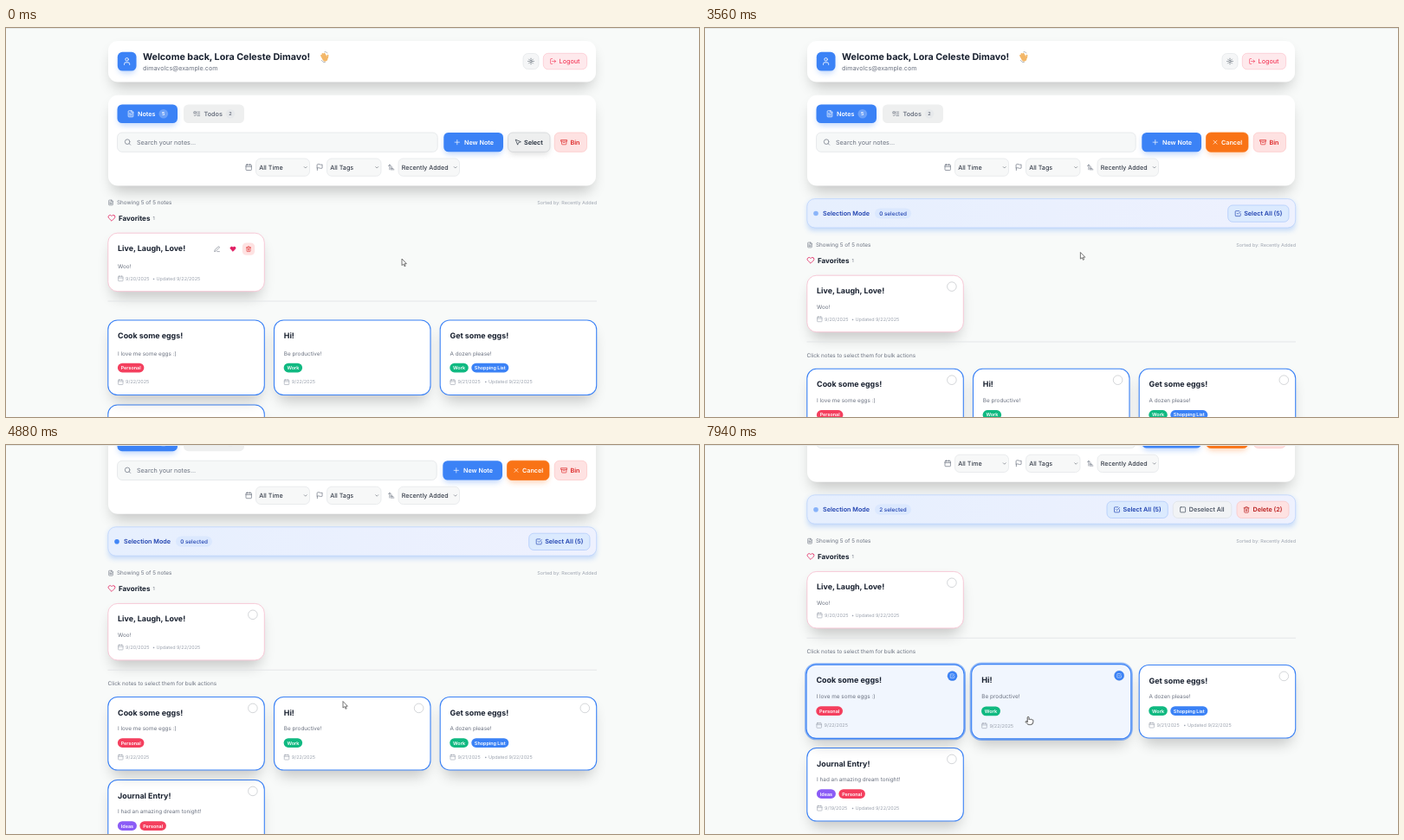
An HTML page that plays this animation: 800 px wide and 450 px high, repeating every 8000 ms.

```html
<!DOCTYPE html>
<html lang="en">
<head>
<meta charset="utf-8">
<title>Notes dashboard</title>
<style>
html, body { margin: 0; width: 100%; height: 100%; overflow: hidden; background: #f8faf9; }
svg { display: block; }
text { font-family: Inter, sans-serif; text-rendering: geometricPrecision; }
.shadow { filter: blur(8px); }
.soft { filter: blur(3px); }
</style>
</head>
<body>
<svg id="stage" width="800" height="450" viewBox="0 0 800 450"></svg>
<script>
const stage = document.getElementById('stage');
const BLUE = '#3b82f6', GREEN = '#10b981', ROSE = '#f43f5e', VIOLET = '#8b5cf6';
const INK = '#18202f', GRAY = '#6b7280', PALE = '#9ca3af', NAVY = '#1e40af', RED = '#dc2626';
const LOOP = 8000, SELECT_AT = 2720, COOK_AT = 6350, HI_AT = 7430;

// Icon outlines on a 24 x 24 grid
const ICONS = {
  user: 'M19 21v-2a4 4 0 0 0-4-4H9a4 4 0 0 0-4 4v2M16 7a4 4 0 1 1-8 0a4 4 0 0 1 8 0',
  sun: 'M16 12a4 4 0 1 1-8 0a4 4 0 0 1 8 0M12 2v2M12 20v2M4.9 4.9l1.4 1.4M17.7 17.7l1.4 1.4M2 12h2M20 12h2M6.3 17.7l-1.4 1.4M19.1 4.9l-1.4 1.4',
  logout: 'M9 21H5a2 2 0 0 1-2-2V5a2 2 0 0 1 2-2h4M16 17l5-5-5-5M21 12H9',
  file: 'M15 2H6a2 2 0 0 0-2 2v16a2 2 0 0 0 2 2h12a2 2 0 0 0 2-2V7ZM14 2v6h6M8 9h2M8 13h8M8 17h8',
  todo: 'M3 5h6v6H3zM3 17l2 2 4-4M13 6h8M13 12h8M13 18h8',
  search: 'M19 11a8 8 0 1 1-16 0a8 8 0 0 1 16 0M21 21l-4.3-4.3',
  plus: 'M12 4v16M4 12h16',
  cross: 'M18 6L6 18M6 6l12 12',
  pointer: 'M4 4l7 17 2.5-7.4 7.5-2.6z',
  bin: 'M2 4h20v5H2zM4 9v9a2 2 0 0 0 2 2h12a2 2 0 0 0 2-2V9M10 13h4',
  calendar: 'M8 2v4M16 2v4M3 10h18M5 4h14a2 2 0 0 1 2 2v14a2 2 0 0 1-2 2H5a2 2 0 0 1-2-2V6a2 2 0 0 1 2-2z',
  flag: 'M4 15s1-1 4-1 5 2 8 2 4-1 4-1V3s-1 1-4 1-5-2-8-2-4 1-4 1zM4 22v-7',
  sort: 'M3 8l4-4 4 4M7 4v16M11 12h4M11 16h7M11 20h10',
  chevron: 'M5 9l7 7 7-7',
  heart: 'M20.8 4.6a5.5 5.5 0 0 0-7.8 0L12 5.7l-1-1a5.5 5.5 0 0 0-7.8 7.8L12 21.2l8.8-8.8a5.5 5.5 0 0 0 0-7.8z',
  pencil: 'M17 3a2.8 2.8 0 0 1 4 4L7.5 20.5 2 22l1.500-5.500zM13 22h9',
  trash: 'M3 6h18M19 6v14a2 2 0 0 1-2 2H7a2 2 0 0 1-2-2V6M8 6V4a2 2 0 0 1 2-2h4a2 2 0 0 1 2 2v2M10 11v6M14 11v6',
  check: 'M9 11l3 3L21 5M21 12v7a2 2 0 0 1-2 2H5a2 2 0 0 1-2-2V5a2 2 0 0 1 2-2h11',
  square: 'M5 3h14a2 2 0 0 1 2 2v14a2 2 0 0 1-2 2H5a2 2 0 0 1-2-2V5a2 2 0 0 1 2-2z',
  hand: 'M7 15V4a2 2 0 0 1 4 0v5a2 2 0 0 1 3.500 0a2 2 0 0 1 3.500 1a2 2 0 0 1 3.500 1v4a7 7 0 0 1-7 7h-2c-3 0-4.500-1-6-2.400l-3.600-3.600a2 2 0 0 1 2.800-2.800z'
};

// Drawing helpers: text and icons are placed by their vertical centre
const rect = (x, y, w, h, r, fill, stroke = 'none', more = '') =>
  `<rect x="${x}" y="${y}" width="${w}" height="${h}" rx="${r}" fill="${fill}" stroke="${stroke}" ${more}/>`;
const circle = (x, y, r, fill, more = '') => `<circle cx="${x}" cy="${y}" r="${r}" fill="${fill}" ${more}/>`;
const text = (x, y, size, str, fill, weight = 400, anchor = 'start') =>
  `<text x="${x}" y="${y + size * .364}" font-size="${size}" fill="${fill}" font-weight="${weight}" text-anchor="${anchor}">${str}</text>`;
const icon = (name, x, y, size, color, fill = 'none') =>
  `<path d="${ICONS[name]}" transform="translate(${x - size / 2} ${y - size / 2}) scale(${size / 24})" fill="${fill}" stroke="${color}" stroke-width="2" stroke-linecap="round" stroke-linejoin="round"/>`;
const shadow = (x, y, w, h) => rect(x + 4, y + 11, w - 8, h - 4, 10, '#000', 'none', 'class="shadow" opacity=".2"');
const glow = (x, y, w, h, color) => rect(x + 1, y + 3, w - 2, h, 6, color, 'none', 'class="soft" opacity=".3"');
const button = (x, y, w, h, name, label, ink, fill, stroke, iconX, textX, weight = 600) =>
  rect(x, y, w, h, 5.5, fill, stroke, 'stroke-width=".7"') +
  icon(name, x + iconX, y + h / 2, 8, ink) + text(x + textX, y + h / 2, 7.2, label, ink, weight);

// Timing helpers
const clamp = v => Math.min(1, Math.max(0, v));
const ramp = (t, from, span = 200) => { const u = clamp((t - from) / span); return u * u * (3 - 2 * u); };
const within = (t, spans) => spans.some(([a, b]) => t >= a && t < b);
const hoverAmount = (t, spans) => spans.reduce((sum, [a, b]) => sum + ramp(t, a) - ramp(t, b), 0);
const mix = (a, b, u) => `rgb(${a.map((v, i) => Math.round(v + (b[i] - v) * u))})`;

const BUTTON_HOVER = [[2250, 3130]];
const COOK_HOVER = [[5850, 6730]];
const HI_HOVER = [[4900, 5750], [6765, 9999]];
const PATH = [[1500, 457, 267], [2350, 596, 124], [3000, 596, 124], [3800, 389, 296.500],
  [5250, 389, 296.500], [6150, 253, 328], [6500, 253, 328], [7050, 373, 314]];

function cursorAt(t) {
  const next = PATH.findIndex(k => k[0] > t);
  if (next === 0) return PATH[0].slice(1);
  if (next < 0) return PATH.at(-1).slice(1);
  const [t0, x0, y0] = PATH[next - 1], [t1, x1, y1] = PATH[next];
  const u = ramp(t, t0, t1 - t0);
  return [x0 + (x1 - x0) * u, y0 + (y1 - y0) * u];
}

function cursor(t) {
  const [x, y] = cursorAt(t);
  if (within(t, [...BUTTON_HOVER, ...COOK_HOVER, ...HI_HOVER])) return icon('hand', x + 1.5, y + 5, 11, '#444', '#fff');
  return `<path d="M${x} ${y}v7.600l1.800-1.500 1.300 2.700 1.100-.5-1.200-2.600h2.400z" fill="#fff" stroke="#555" stroke-width=".8" stroke-linejoin="round"/>`;
}

function header() {
  return shadow(118, 15, 563, 47) + rect(118, 15, 563, 47.500, 11, '#fff') +
    glow(129, 28, 21.500, 21.500, BLUE) + rect(128.800, 27.800, 21.700, 21.700, 5.500, BLUE) + icon('user', 139.600, 38.500, 10.500, '#fff') +
    text(158, 33.400, 10.700, 'Welcome back, Lora Celeste Dimavo!', INK, 700) +
    text(158, 46, 7.200, 'dimavolcs@example.com', GRAY) +
    `<g transform="translate(367.500 34) rotate(-28)" stroke="#f3b768" stroke-width="1.900" stroke-linecap="round">
      <path d="M-2 0v-3.600M0 0v-4.500M2 0v-3.800M3 2l1.600-2.200"/><ellipse cy="1.500" rx="3" ry="3.300" fill="#f3b768" stroke="none"/>
      <path d="M-4.500 1.500q0 3 2.600 4M3.500-5.500q1.800 .8 2 2.700" fill="none" stroke="#a9adb2" stroke-width=".8"/></g>` +
    rect(597, 29.500, 18, 18, 5.500, '#f5f6f7', '#e2e5e9', 'stroke-width=".7"') + icon('sun', 606, 38.500, 8, '#4b5563') +
    button(620.300, 29.300, 50.300, 18.500, 'logout', 'Logout', ROSE, '#fee9ec', '#fdc4cd', 11.300, 18.300, 500);
}

function dropdown(name, x, w, label) {
  return icon(name, x - 8.300, 161, 8.500, GRAY) +
    rect(x, 151, w, 20.300, 5.500, '#f7f8f8', '#e2e5e9', 'stroke-width=".7"') +
    text(x + 3.800, 161.200, 7.200, label, INK) + icon('chevron', x + w - 4.800, 161.200, 5, INK);
}

function toolbar(t, selecting) {
  const shift = selecting ? ramp(t, 2850, 250) - 2 : 0;
  const turn = ramp(t, 2790, 220), hover = hoverAmount(t, BUTTON_HOVER);
  const grey = mix([238, 239, 239], [218, 218, 219], hover);
  const left = 579.500 + shift;
  const fill = selecting ? mix([218, 218, 219], [249, 115, 22], turn) : grey;
  const edge = selecting ? mix([200, 200, 203], [249, 115, 22], turn) : '#cfd1d5';
  const ink = selecting ? mix([31, 41, 55], [255, 255, 255], turn) : '#1f2937';
  return shadow(118, 78, 563, 104.500) + rect(118, 77.800, 563, 104.700, 11, '#fff') +
    glow(128.500, 88.500, 69.500, 21.500, BLUE) + rect(128.500, 88.500, 69.500, 21.500, 5.500, BLUE) +
    icon('file', 144, 99.300, 8.500, '#fff') + text(152, 99.400, 7.200, 'Notes', '#fff', 600) +
    circle(181.800, 99.300, 5.300, '#fff', 'opacity=".25"') + text(181.800, 99.300, 5.500, 5, '#fff', 600, 'middle') +
    rect(205, 88.500, 70, 21.500, 5.500, '#eeefef') + icon('todo', 220.500, 99.300, 8.500, GRAY) +
    text(228.500, 99.400, 7.200, 'Todos', GRAY, 600) + circle(259, 99.300, 5.300, '#e7e9eb') + text(259, 99.300, 5.500, 2, GRAY, 600, 'middle') +
    rect(128.500, 121, 369.700 + shift, 22.300, 5.500, '#f6f8f8', '#e0e3e6', 'stroke-width=".7"') +
    icon('search', 140.500, 132, 8.500, GRAY) + text(151, 132.200, 7.200, 'Search your notes...', GRAY) +
    glow(505 + shift, 121, 69, 22.300, BLUE) +
    button(505.300 + shift, 121, 68.700, 22.300, 'plus', 'New Note', '#fff', BLUE, 'none', 15.500, 23.700) +
    glow(left, 121, 48.500, 22.300, selecting ? fill : '#999') +
    button(left, 121, 48.500, 22.300, selecting ? 'cross' : 'pointer', selecting ? 'Cancel' : 'Select', ink, fill, edge,
      selecting ? 10.500 : 11.500, selecting ? 17.500 : 18.500) +
    button(633.200, 121, 37.300, 22.300, 'bin', 'Bin', RED, '#fee2e2', '#fdc5c5', 11, 18.300) +
    dropdown('calendar', 288.500, 62, 'All Time') + dropdown('flag', 370.500, 62.500, 'All Tags') + dropdown('sort', 453, 70.500, 'Recently Added');
}

function selectionBar(t, count) {
  const opacity = .75 + .25 * Math.cos((t - SELECT_AT) * Math.PI / 1000);
  const deleteW = count === 2 ? 60 : 58.300;
  const deleteX = 674 - deleteW, deselectX = deleteX - 73.700;
  const selectX = count ? deselectX - 76.300 : 603.700;
  let s = glow(117.500, 197.500, 564.500, 33.500, BLUE) +
    rect(117.800, 197.600, 563.900, 33.400, 9, 'url(#bar)', '#bdd3fb', 'stroke-width=".8"') +
    circle(128, 214.500, 2.800, BLUE, `opacity="${opacity}"`) +
    text(136, 214.600, 7.200, 'Selection Mode', NAVY, 600) +
    rect(196, 208.400, 42, 12.200, 6.100, '#dbe8fe') + text(217, 214.600, 6.350, count + ' selected', NAVY, 500, 'middle') +
    button(selectX, 205, 70.300, 19.300, 'check', 'Select All (5)', NAVY, '#dbeafe', '#abc8fb', 11.500, 18.500);
  if (count) s +=
    button(deselectX, 205, 67.500, 19.300, 'square', 'Deselect All', '#374151', '#f1f3f5', '#dde1e6', 11.300, 18.500, 500) +
    button(deleteX, 205, deleteW, 19.300, 'trash', `Delete (${count})`, '#b91c1c', '#fee2e2', '#fdc2c2', 11, 18.500);
  return s;
}

// A note card; marked goes from 0 (plain) to 1 (ticked)
function card({ x, y, title, body, tags = [], date, updated, favorite, selecting, marked = 0, hover = 0 }) {
  const w = 180.500, drop = selecting ? 2 : 0;
  const h = (favorite ? 67.500 : 86.500) - drop, left = x + 11.300;
  const scale = 1 + Math.max(.02 * hover, .008 * marked);
  const cx = x + w / 2, cy = y + h / 2, dateY = y + h - 15;
  let tagX = left - .2;
  let s = shadow(x, y, w, h);
  if (marked) s += rect(x - .8, y - .8, w + 1.600, h + 1.600, 12, 'none', BLUE, `stroke-width="2.400" opacity="${.55 * marked}"`);
  s += rect(x, y, w, h, 11, mix([255, 255, 255], [241, 246, 254], marked), favorite ? '#f6c3d3' : BLUE, `stroke-width="${favorite ? .9 : 1.100}"`) +
    text(left, y + 17.800, 8.900, title, INK, 700) + text(left, y + 38.400 - drop, 6.350, body, GRAY);
  for (const [label, color, width] of tags) {
    s += rect(tagX, y + 49.800 - drop, width, 10.600, 5.300, color) +
      text(tagX + width / 2, y + 55.100 - drop, 5.450, label, '#fff', 600, 'middle');
    tagX += width + 3.500;
  }
  s += icon('calendar', left + 3.200, dateY, 7.300, PALE) + text(left + 9, dateY, 5.450, date, PALE);
  if (updated) s += text(left + 39.800, dateY, 5.450, '• Updated ' + updated, PALE);
  if (selecting) {
    const tx = x + 167.100, ty = y + 12.900;
    s += circle(tx, ty, 5.300, '#fff', 'stroke="#cfd1d4" stroke-width=".9"');
    if (marked) s += `<g opacity="${marked}">${circle(tx, ty, 5.600, BLUE)}${icon('check', tx, ty, 6, '#fff')}</g>`;
  } else if (favorite) {
    s += icon('pencil', 243.500, y + 18.500, 7, GRAY) + icon('heart', 262, y + 18.500, 7, '#e11d62', '#e11d62') +
      rect(272.800, y + 11.300, 14.300, 14.300, 4.500, '#fee2e2') + icon('trash', 280, y + 18.500, 7, RED);
  }
  return `<g transform="translate(${cx} ${cy}) scale(${scale}) translate(${-cx} ${-cy})">${s}</g>`;
}

function notes(t, selecting) {
  const move = selecting ? 49 : 0, rowY = selecting ? 394.300 : 338, nextY = selecting ? 490.300 : 436;
  const ruleY = selecting ? 363 : 316;
  const work = ['Work', GREEN, 21.500], personal = ['Personal', ROSE, 30.500];
  const put = note => card({ selecting, ...note });
  return icon('file', 121, 202 + move, 7, GRAY) + text(128, 202 + move, 6.350, 'Showing 5 of 5 notes', GRAY) +
    text(682, 202 + move, 5.450, 'Sorted by: Recently Added', PALE, 400, 'end') +
    icon('heart', 122, 219.800 + move, 9, '#e11d5a') + text(130, 220 + move, 8.050, 'Favorites', INK, 700) +
    text(169.500, 220 + move, 5.450, 1, GRAY) +
    put({ x: 117.800, y: 237.200 + move, title: 'Live, Laugh, Love!', body: 'Woo!', date: '9/20/2025', updated: '9/22/2025', favorite: true }) +
    rect(117.500, ruleY - .4, 564.500, .8, 0, '#dfe2e4') +
    (selecting ? text(117.500, 379, 6.350, 'Click notes to select them for bulk actions', GRAY) : '') +
    put({ x: 117.800, y: nextY, title: 'Journal Entry!', body: 'I had an amazing dream tonight!', tags: [['Ideas', VIOLET, 22], personal], date: '9/19/2025', updated: '9/22/2025' }) +
    put({ x: 501.200, y: rowY, title: 'Get some eggs!', body: 'A dozen please!', tags: [work, ['Shopping List', BLUE, 43]], date: '9/21/2025', updated: '9/22/2025' }) +
    put({ x: 117.800, y: rowY, title: 'Cook some eggs!', body: 'I love me some eggs :)', tags: [personal], date: '9/22/2025',
      marked: ramp(t, COOK_AT), hover: hoverAmount(t, COOK_HOVER) }) +
    put({ x: 309.500, y: rowY, title: 'Hi!', body: 'Be productive!', tags: [work], date: '9/22/2025',
      marked: ramp(t, HI_AT), hover: hoverAmount(t, HI_HOVER) });
}

function draw() {
  const t = performance.now() % LOOP;
  const selecting = t >= SELECT_AT;
  const count = (t >= COOK_AT) + (t >= HI_AT);
  const scroll = 102.800 * ramp(t, 4400, 470) + 37 * ramp(t, 7590, 310);
  stage.innerHTML = `<defs><linearGradient id="bar"><stop stop-color="#e6effe"/><stop offset="1" stop-color="#eef1fe"/></linearGradient></defs>` +
    rect(0, 0, 800, 450, 0, '#f8faf9') +
    `<g transform="translate(0 ${-scroll})">${header()}${toolbar(t, selecting)}${selecting ? selectionBar(t, count) : ''}${notes(t, selecting)}</g>` +
    rect(0, 0, 800, 1, 0, '#e6e9e8') + cursor(t);
  requestAnimationFrame(draw);
}
draw();
</script>
</body>
</html>
```
